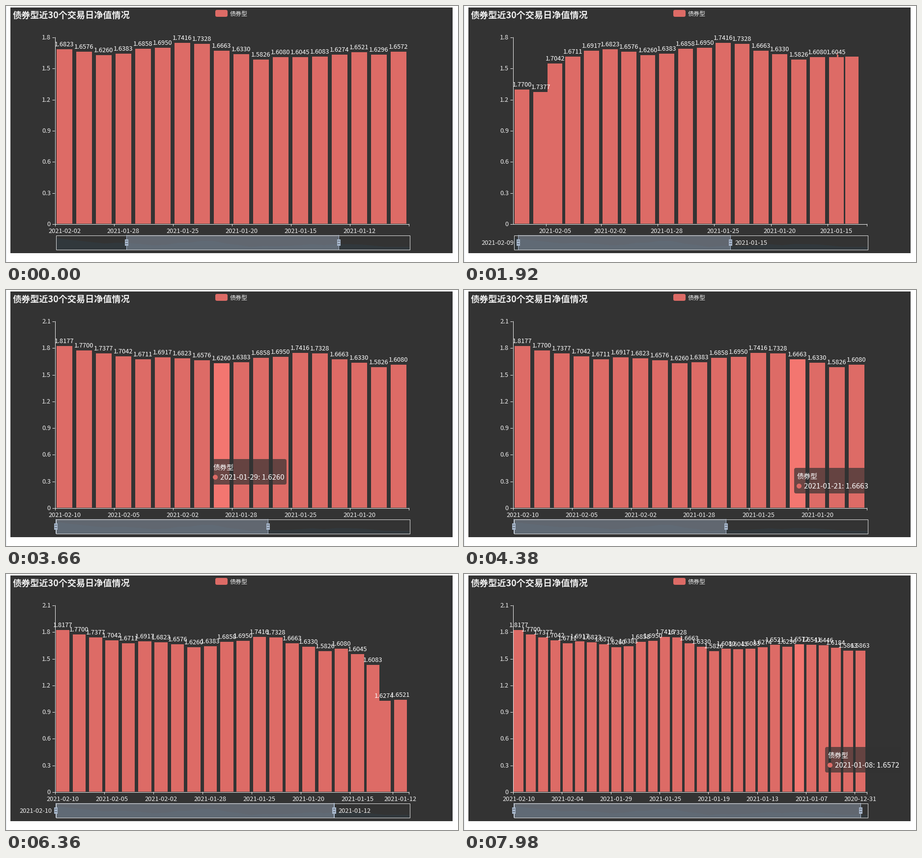
A matplotlib script that plays this animation: 920 px wide and 521 px high, repeating every 8 s.

```python
import math
from collections import namedtuple

import matplotlib.pyplot as plt
import numpy as np
from matplotlib.animation import FuncAnimation
from matplotlib.collections import LineCollection, PolyCollection
from matplotlib.patches import Circle, FancyBboxPatch, Polygon, Rectangle

W, H, DPI = 920, 521, 64  # a power of two keeps the pixel size exact
PX = 72 / DPI
LOOP, INTERVAL, REFRESH = 8000, 40, 60

BG, INK, WHITE = "#333333", "#eeeeee", "#ffffff"
BAR, BAR_HOT, HANDLE = "#dd6b66", "#f37670", "#a7b7cc"
X0, PLOT_W, TOP, BASE = 99, 720, 63, 443
SL_X, SL_W, SL_TOP, SL_BOT = 101.5, 720, 466, 496
TIP_W, TIP_H = 155, 52

DAYS = ("02-10 02-09 02-08 02-05 02-04 02-03 02-02 02-01 01-29 01-28 "
        "01-27 01-26 01-25 01-22 01-21 01-20 01-19 01-18 01-15 01-14 "
        "01-13 01-12 01-11 01-08 01-07 01-06 01-05 01-04 12-31 12-30").split()
DATES = [("2020-" if d.startswith("12") else "2021-") + d for d in DAYS]
VALUES = [1.8177, 1.7700, 1.7377, 1.7042, 1.6711, 1.6917, 1.6823, 1.6576,
          1.6260, 1.6383, 1.6858, 1.6950, 1.7416, 1.7328, 1.6663, 1.6330,
          1.5826, 1.6080, 1.6045, 1.6083, 1.6274, 1.6521, 1.6296, 1.6572,
          1.6541, 1.6446, 1.6184, 1.5863, 1.5863, 1.5840]
N = len(VALUES)

# Slider drag in pixels: (time, left edge) and (time, window width)
LEFT = [(1400, 144), (1500, 124), (1580, 97), (1655, 70), (1740, 35),
        (1830, 29), (1905, 22), (1920, 9), (2000, 0)]
WIDTH = [(5820, 432), (6020, 452), (6105, 477), (6200, 516), (6300, 529),
         (6360, 566.5), (6390, 572), (6600, 580), (6680, 595), (6758, 620),
         (6838, 645), (6918, 670), (6998, 690), (7080, 692), (7300, 703),
         (7520, 706)]
# Moments when the chart redraws itself for the dragged window
ZOOMS = [-5000, 1500, 1580, 1655, 1740, 1830, 1909, 2000, 2090,
         6020, 6105, 6200, 6300, 6390, 6680, 6758, 6838, 6918, 6998,
         7100, 7200, 7300]
SLIDER_HOVER = [(840, 2460), (5220, 7620)]

# Pointer paths over the bars: (time, x, y)
HOVERS = [
    [(300, 622, 320), (420, 600, 330), (560, 545, 370), (720, 515, 412)],
    [(2560, 150, 412), (2900, 158, 345), (3080, 160, 330), (3360, 308, 324),
     (3660, 440, 324), (3860, 495, 330), (4380, 690, 345), (4560, 712, 350),
     (4660, 716, 352), (4720, 768, 372), (4920, 771, 400)],
    [(7840, 724, 336), (7930, 720, 332), (7980, 688, 324), (8040, 684, 322)],
]


def keyed(keys, t, col=1):
    return np.interp(t, [k[0] for k in keys], [k[col] for k in keys])


def drag_edges(t):
    left = keyed(LEFT, t)
    return left, left + keyed(WIDTH, t)


class Tween(namedtuple("Tween", "a b t0 dur")):
    def at(self, t):
        p = min(max((t - self.t0) / self.dur, 0), 1)
        return self.a + (self.b - self.a) * (1 - (1 - p) ** 3)


def layout(lo, hi):
    """Bars as (left, width, height), value ticks as (y,)."""
    band = PLOT_W / (hi - lo + 1)
    steps = math.ceil(max(VALUES[lo:hi + 1]) / 0.3 - 1e-9)
    unit = (BASE - TOP) / steps
    goal = {("bar", i): np.array([X0 + (i - lo + 0.1) * band, 0.8 * band,
                                  VALUES[i] / 0.3 * unit])
            for i in range(lo, hi + 1)}
    goal.update({("tick", k): np.array([BASE - k * unit])
                 for k in range(steps + 1)})
    return goal


def build_stages():
    live, stages = {}, []
    for t in ZOOMS:
        lo, hi = (round(e / SL_W * (N - 1)) for e in drag_edges(t))
        goal, nxt = layout(lo, hi), {}
        for key, b in goal.items():
            if key in live:
                nxt[key] = Tween(live[key].at(t), b, t, 300)
            else:
                a = b * [1, 1, 0] if key[0] == "bar" else b
                nxt[key] = Tween(a, b, t, 1000)
        for (kind, i), tw in live.items():
            if kind == "bar" and (kind, i) not in goal:
                now = tw.at(t)
                nxt["gone", i] = Tween(now, now * [1, 0, 1], t, 300)
            elif kind == "gone" and t < tw.t0 + tw.dur:
                nxt[kind, i] = tw
        live = nxt
        stages.append((t, lo, hi, live))
    return stages


STAGES = build_stages()

fig = plt.figure(figsize=(W / DPI, H / DPI), dpi=DPI, facecolor="white")
ax = fig.add_axes([0, 0, 1, 1])
ax.set(xlim=(0, W), ylim=(H, 0))
ax.axis("off")


def box(x0, y0, x1, y1, color, z=1, **kw):
    return ax.add_patch(Rectangle((x0, y0), x1 - x0, y1 - y0, fc=color,
                                  lw=0, zorder=z, **kw))


def round_box(x, y, w, h, r, color, z, **kw):
    return ax.add_patch(FancyBboxPatch(
        (x, y), w, h, boxstyle=f"round,pad=0,rounding_size={r}",
        fc=color, lw=0, zorder=z, **kw))


def label(x, y, s, size=12.9, color=INK, ha="left", z=5, **kw):
    return ax.text(x, y, s, fontsize=size * PX, color=color, ha=ha,
                   va="baseline", family="Noto Sans CJK JP", zorder=z, **kw)


def lines(color, z):
    return ax.add_collection(LineCollection([], colors=color,
                                            linewidths=PX, zorder=z))


def quad(x0, y0, x1, y1):
    return [(x0, y0), (x1, y0), (x1, y1), (x0, y1)]


# Static page
box(0, 0, 1, H, "#e1e8ee")
box(9, 3, 909, 503, BG)
label(14, 24.5, "债券型近30个交易日净值情况", 18.1, weight="bold")
round_box(426, 8, 25, 14, 3.5, BAR, 2)
label(456, 20.3, "债券型", 12)

# Slider
lo_v, hi_v = min(VALUES), max(VALUES)
pad = 0.3 * (hi_v - lo_v)
shade = [(SL_X + SL_W * i / (N - 1),
          SL_BOT - 30 * (v - lo_v + pad) / (hi_v - lo_v + 2 * pad))
         for i, v in enumerate(VALUES)]
ax.add_patch(Polygon(shade + [(SL_X + SL_W, SL_BOT), (SL_X, SL_BOT)],
                     fc="#2f4554", alpha=0.3, lw=0, zorder=1.5))
filler = box(0, SL_TOP, 1, SL_BOT, "#a7b7cc", 2, alpha=0.4)
ax.add_patch(Rectangle((SL_X, SL_TOP + 0.5), SL_W, 29, fc="none",
                       ec="#dddddd", lw=PX, zorder=3))
grips = ax.add_collection(PolyCollection([], facecolors=HANDLE,
                                         linewidths=0, zorder=4))
slots = ax.add_collection(PolyCollection([], facecolors="#4a4f57",
                                         linewidths=0, zorder=4.1))
ends = [label(0, 486, "", ha="right"), label(0, 486, "")]

# Chart
bars = ax.add_collection(PolyCollection([], linewidths=0, zorder=2))
axes_lines = lines(INK, 3)
bar_labels = [label(0, 0, f"{v:.4f}", color=WHITE, ha="center")
              for v in VALUES]
x_labels = [label(0, 462, d, ha="center") for d in DATES]
y_labels = [label(91, 0, f"{0.3 * k:.1f}" if k else "0", ha="right")
            for k in range(8)]

# Tooltip
tip_box = round_box(0, 0, TIP_W, TIP_H, 4, "#323232", 7, alpha=0.7)
tip_name = label(0, 0, "债券型", 14, WHITE, z=8)
tip_text = label(0, 0, "", 15, WHITE, z=8)
tip_dot = ax.add_patch(Circle((0, 0), 5, fc=BAR, lw=0, zorder=8))
TIP = [tip_box, tip_name, tip_text, tip_dot]


def draw_tooltip(t, lo, hi):
    """Place the tooltip and return the index of the lit bar, if any."""
    path = next((p for p in HOVERS if p[0][0] <= t < p[-1][0]), None)
    for a in TIP:
        a.set_visible(path is not None)
    if path is None:
        return None
    # the box trails the pointer and flips near the right edge
    ts = np.linspace(max(path[0][0], t - 200), t, 21)
    xs = keyed(path, ts)
    left = np.where(xs + 20 + TIP_W > 909, xs - 20 - TIP_W, xs + 20).mean()
    top = keyed(path, ts, 2).mean() + 20
    left, top = round(left), round(top)
    pos = (keyed(path, t) - X0) / PLOT_W * (hi - lo + 1)
    i = min(lo + int(pos), hi)
    tip_box.set_bounds(left, top, TIP_W, TIP_H)
    tip_name.set_position((left + 5, top + 21.5))
    tip_text.set_position((left + 20, top + 42))
    tip_text.set_text(f"{DATES[i]}: {VALUES[i]:.4f}")
    tip_dot.center = (left + 10, top + 37)
    return i if 0.1 <= pos % 1 <= 0.9 else None


def draw_slider(t, lo, hi):
    edges = [SL_X + e for e in drag_edges(t)]
    filler.set_x(edges[0])
    filler.set_width(edges[1] - edges[0])
    grips.set_verts([q for x in edges for q in (
        quad(x - 0.83, SL_TOP, x + 0.83, SL_BOT),
        quad(x - 3.7, 474.5, x + 3.7, 487.5))])
    slots.set_verts([quad(x - 2.15, y, x + 2.15, y + 1.2)
                     for x in edges for y in (478.1, 482.7)])
    shown = any(a <= t < b for a, b in SLIDER_HOVER)
    for text, x, i in zip(ends, (edges[0] - 8.5, edges[1] + 8.5), (lo, hi)):
        text.set_visible(shown)
        text.set_x(x)
        text.set_text(DATES[i])


def draw_chart(t, lo, hi, live, lit):
    step = int(87 / (PLOT_W / (hi - lo + 1))) + 1
    segs = [[(X0 + 0.5, TOP), (X0 + 0.5, BASE + 1)],
            [(X0, BASE + 0.5), (X0 + PLOT_W + 1, BASE + 0.5)],
            [(X0 + PLOT_W + 0.5, BASE), (X0 + PLOT_W + 0.5, BASE + 5)]]
    for text in bar_labels + x_labels + y_labels:
        text.set_visible(False)
    quads, colors = [], []
    for (kind, i), tw in live.items():
        now = tw.at(t)
        if kind == "tick":
            y = round(now[0]) + 0.5
            segs.append([(X0 - 5, y), (X0, y)])
            y_labels[i].set_visible(True)
            y_labels[i].set_y(y + 4.2)
            continue
        x, w, h = now
        quads.append(quad(x, BASE - h, x + w, BASE))
        colors.append(BAR_HOT if kind == "bar" and i == lit else BAR)
        if kind == "gone":
            continue
        mid = x + w / 2
        bar_labels[i].set_visible(True)
        bar_labels[i].set_position((mid, BASE - h - 6))
        if i % step == 0:
            x_labels[i].set_visible(True)
            x_labels[i].set_x(mid)
            tx = round(mid - w / 1.6) + 0.5
            segs.append([(tx, BASE), (tx, BASE + 5)])
    bars.set_verts(quads)
    bars.set_facecolor(colors)
    axes_lines.set_segments(segs)


def draw(k):
    t = (k * INTERVAL + REFRESH // 3) // REFRESH * REFRESH
    _, lo, hi, live = [s for s in STAGES if s[0] <= t][-1]
    lit = draw_tooltip(t, lo, hi)
    draw_slider(t, lo, hi)
    draw_chart(t, lo, hi, live, lit)
    return []


anim = FuncAnimation(fig, draw, frames=LOOP // INTERVAL, interval=INTERVAL,
                     init_func=lambda: draw(0), repeat=True)
plt.show()
```
